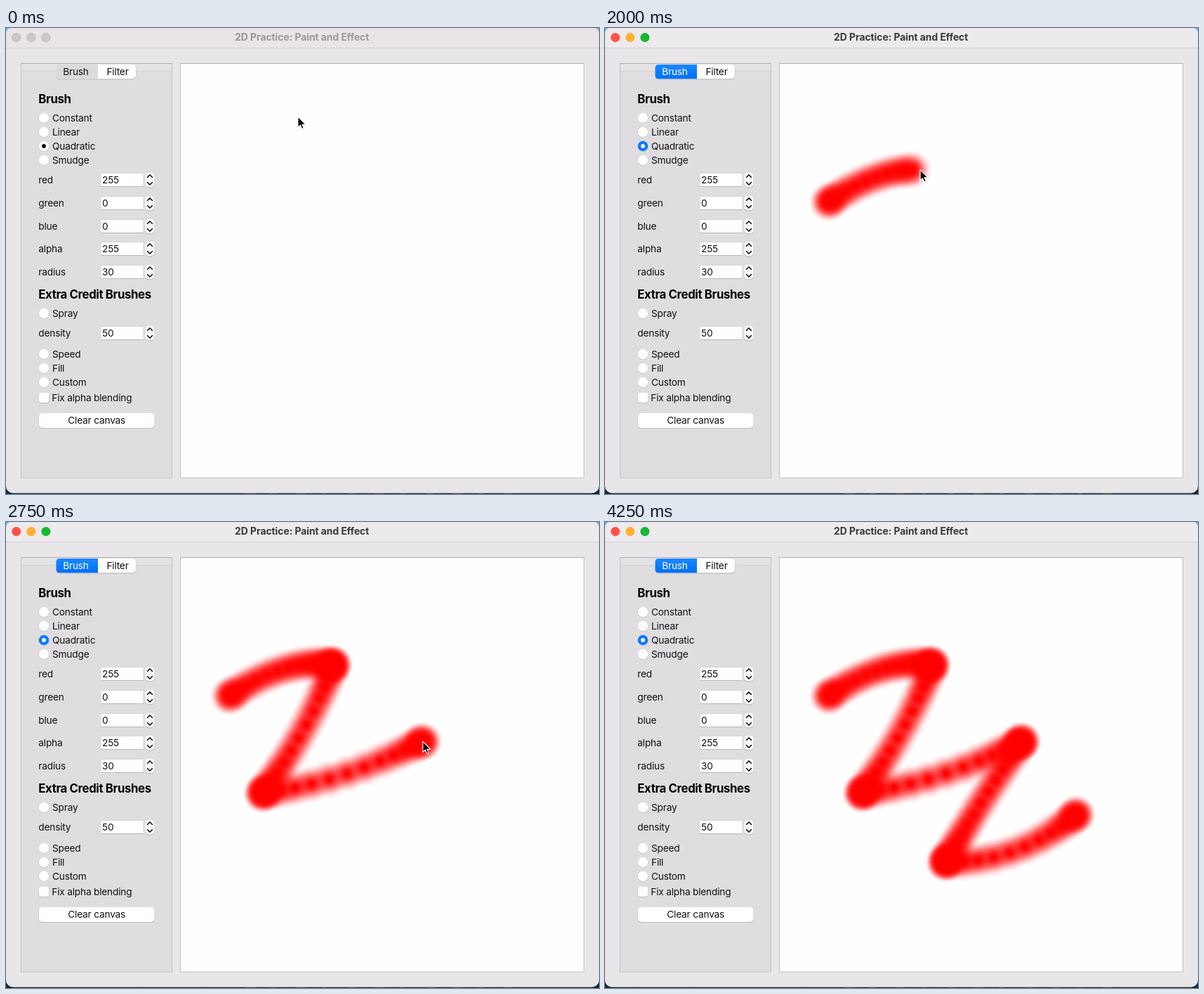
An HTML page for the animation above (4330 ms loop, 845 by 663 pixels).

```html
<!DOCTYPE html>
<html lang="en">
<head>
<meta charset="utf-8">
<title>Paint window</title>
<style>
  html, body { margin: 0; width: 100%; height: 100%; overflow: hidden; background: #10303f; }
  svg { display: block; width: 845px; height: 663px; }
  text { font: 13.7px Inter, "Open Sans", sans-serif; letter-spacing: -.2px; fill: #111; white-space: pre; }
  .head { font-size: 16.8px; font-weight: 700; letter-spacing: -.4px; fill: #000; }
  .title { font-size: 14px; font-weight: 700; letter-spacing: -.1px; }
  .mid { text-anchor: middle; }
</style>
</head>
<body>
<svg viewBox="0 0 845 663" xmlns="http://www.w3.org/2000/svg">
  <defs>
    <radialGradient id="dab"></radialGradient>
    <linearGradient id="desk" x2="0" y2="1">
      <stop offset="0" stop-color="#7db4e0"/><stop offset="1" stop-color="#0e2c3b"/>
    </linearGradient>
    <linearGradient id="blue" x2="0" y2="1">
      <stop offset="0" stop-color="#1a88ff"/><stop offset="1" stop-color="#0070f5"/>
    </linearGradient>
  </defs>
  <g id="frame"></g>
  <g id="form"></g>
  <g id="paint"></g>
  <path id="cursor" d="M0 0V15.4L3.5 12.2 5.9 17.6 8.3 16.6 6 11.3H11Z"
    fill="#000" stroke="#fff" stroke-width="1.1" stroke-linejoin="round"/>
</svg>
<script>
const $ = id => document.getElementById(id);

function add(parent, tag, attrs, content) {
  const el = document.createElementNS("http://www.w3.org/2000/svg", tag);
  for (const key in attrs) el.setAttribute(key, attrs[key]);
  if (content) el.textContent = content;
  parent.appendChild(el);
  return el;
}
const frame = $("frame"), form = $("form"), cursor = $("cursor");
const rect = (g, x, y, width, height, fill, more) =>
  add(g, "rect", { x, y, width, height, fill, ...more });
const label = (x, y, content, cls = "") => add(form, "text", { x, y, class: cls }, content);

// Window, side panel and drawing area
rect(frame, 0, 0, 845, 663, "url(#desk)");
for (let x = 340; x < 740; x += 37) rect(frame, x, 662, 6 + x % 11, 1, "#4a4630");
rect(frame, 0, -1, 845, 662.8, "#e9e6e9", { rx: 10 });
const bar = add(frame, "path", { d: "M0 28V9Q0 0 9 0H836Q845 0 845 9V28Z" });
rect(frame, 0, 28, 845, 1, "#d3d0d3");
function well(x, width, fill) {
  rect(frame, x + .5, 50.5, width - 1, 589.5, fill, { stroke: "#c3c0c3" });
  rect(frame, x, 50, width, 1, "#b1aeb1");
}
well(21, 216, "#e5e2e5");
rect(frame, 22, 61, 214, 578.5, "#e0dde0");
rect(frame, 22, 61, 214, 1, "#d5d2d5");
well(248, 576, "#fffeff");

const lights = ["#ff5148", "#ffb02e", "#17b82f"].map((color, i) => ({
  color, el: add(form, "circle", { cx: 14.7 + i * 21.1, cy: 13.5, r: 6.2, "stroke-width": .7 })
}));
const title = label(421.7, 18, "2D Practice: Paint and Effect", "title mid");

// White control with a soft lower edge
function control(x, y, w, h, rx) {
  rect(form, x - .4, y + .4, w + .8, h + .7, "#bfbcbf", { rx: rx + .4 });
  rect(form, x, y, w, h, "#fff", { rx });
}
function radio(y, name) {
  add(form, "circle", { cx: 54, cy: y + .4, r: 7.6, fill: "#cac7ca" });
  const disc = add(form, "circle", { cx: 54, cy: y, r: 7.2, fill: "#fff" });
  label(66, y + 5, name);
  return disc;
}
function spin(y, name, value) {
  label(46.3, y + 5, name);
  rect(form, 135, y - 9.5, 61, 19, "#cdcacd");
  rect(form, 135.5, y - 9, 60, 18, "#fff");
  rect(form, 135, y + 9, 61, 1, "#bab7ba");
  label(137, y + 5, value);
  control(198.3, y - 10, 13.2, 20.3, 5);
  add(form, "path", {
    d: `M201.5 ${y - 3.6}l3.5 -3.5 3.5 3.5M201.5 ${y + 3.6}l3.5 3.5 3.5 -3.5`,
    fill: "none", stroke: "#222", "stroke-width": 1.6,
    "stroke-linecap": "round", "stroke-linejoin": "round"
  });
  rect(form, 198.5, y - .3, 13, .7, "#dddadd");
}

control(71.5, 52, 113.5, 20.3, 5);
const tab = add(form, "path", { d: "M131 52H76.5Q71.5 52 71.5 57V67.3Q71.5 72.3 76.5 72.3H131Z" });
const tabText = label(99.5, 67, "Brush", "mid");
label(159, 67, "Filter", "mid");

label(46.3, 107, "Brush", "head");
const picked = ["Constant", "Linear", "Quadratic", "Smudge"].map((name, i) => radio(128 + i * 20, name))[2];
const dot = add(form, "circle", { cx: 54, cy: 168, r: 2.9 });
Object.entries({ red: "255", green: "0", blue: "0", alpha: "255", radius: "30" })
  .forEach(([name, value], i) => spin(216 + Math.round(i * 32.75), name, value));
label(46.3, 385, "Extra Credit Brushes", "head");
radio(406, "Spray");
spin(434, "density", "50");
["Speed", "Fill", "Custom"].forEach((name, i) => radio(464 + i * 20, name));
control(47, 519, 14, 14, 3);
label(65.3, 531, "Fix alpha blending");
control(47, 548, 164.5, 21, 5);
label(129.2, 563, "Clear canvas", "mid");

// Each dab lays the quadratic falloff (1 - d)^2 down twice
for (let i = 0; i <= 20; i++) {
  const d = i / 20;
  add($("dab"), "stop", { offset: d, "stop-color": "#f00", "stop-opacity": 1 - (1 - (1 - d) ** 2) ** 2 });
}

// Time is counted in pointer events, 60 per second; the picture refreshes every fifth
const LOOP = 4330, TICK = 1000 / 12, PER_TICK = 5, FOCUS_TICK = 18, LEAD = 1.2;

// Pointer moves: start, length, point it bends towards, end point
const moves = [];
let at = [416, 126];
function move(start, length, to, bend) {
  const from = at;
  const via = bend || from.map((v, i) => (v + to[i]) / 2);
  moves.push({ start, length, from, via, to, paints: !!bend });
  at = to;
}
move(0, 20, [414, 146]);
move(57, 13, [408, 160]);
move(70, 10, [318, 248]);
move(109, 18, [466, 203], [398, 193]);
move(127, 17, [366, 386], [436, 288]);
move(146, 16, [594, 312], [478, 371]);
move(166, 19, [485, 484], [532, 402]);
move(185, 15, [672, 416], [588, 486]);
move(230, 25, [620, 700]);

// Smootherstep with the fastest point a little before the middle
function ease(u) {
  const v = Math.min(1, Math.max(0, u)) ** .8;
  return v ** 3 * (v * (6 * v - 15) + 10);
}
function position({ start, length, from, via, to }, time) {
  const s = ease((time - start) / length), r = 1 - s;
  return from.map((v, i) => r * r * v + 2 * r * s * via[i] + s * s * to[i]);
}

// One dab per pointer event while painting
const dabs = [];
for (const m of moves.filter(m => m.paints)) {
  for (let time = m.start; time <= m.start + m.length; time++) {
    const [cx, cy] = position(m, time);
    dabs.push({ time, el: add($("paint"), "circle", { cx, cy, r: 30, fill: "url(#dab)" }) });
  }
}

function draw(ms) {
  const tick = Math.floor((ms % LOOP + 5) / TICK);
  const now = tick * PER_TICK;
  const active = tick >= FOCUS_TICK;
  bar.setAttribute("fill", active ? "#edeaed" : "#e8e4e8");
  title.style.fill = active ? "#3c393c" : "#9b989b";
  for (const { el, color } of lights) {
    el.setAttribute("fill", active ? color : "#cbc8cb");
    el.setAttribute("stroke", active ? color : "#b3b0b3");
  }
  tab.setAttribute("fill", active ? "url(#blue)" : "#dddadd");
  tabText.style.fill = active ? "#fff" : "#111";
  picked.setAttribute("fill", active ? "#087aff" : "#fff");
  dot.setAttribute("fill", active ? "#fff" : "#111");

  for (const { time, el } of dabs) el.style.display = time <= now ? "" : "none";

  // While painting, the pointer runs slightly ahead of the paint
  const current = lead => moves.filter(m => m.start <= now + lead).pop();
  const lead = current(0).paints ? LEAD : 0;
  const [x, y] = position(current(lead), now + lead);
  cursor.setAttribute("transform", `translate(${x} ${y})`);
}

const start = performance.now();
function loop() {
  draw(performance.now() - start);
  requestAnimationFrame(loop);
}
loop();
</script>
</body>
</html>
```
